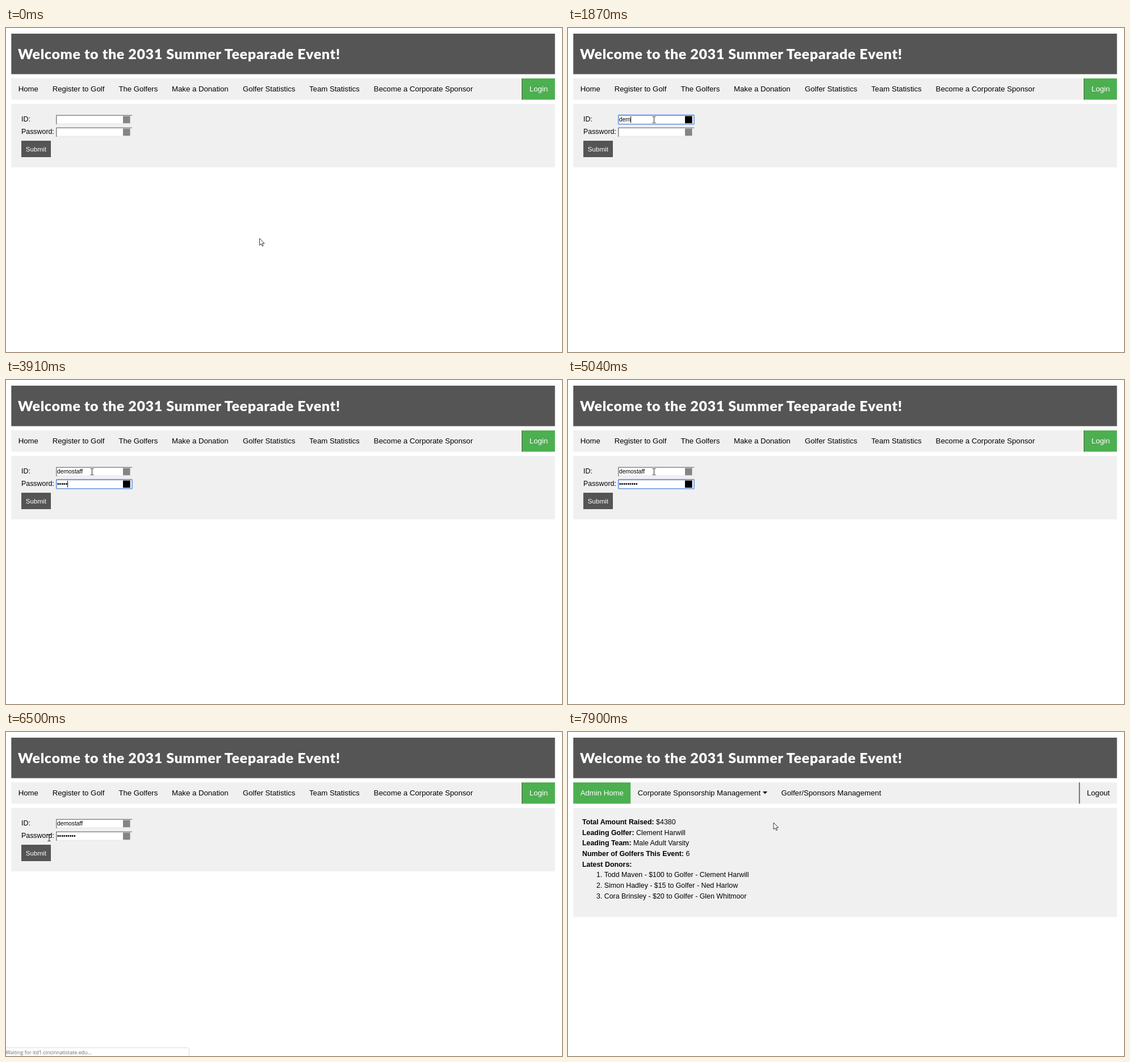
An HTML page for the animation above (8 s loop, 979x572 px).

```html
<!DOCTYPE html>
<html lang="en">
<head>
<meta charset="utf-8">
<title>Event login</title>
<style>
  html, body { margin: 0; width: 100%; height: 100%; overflow: hidden; background: #fff; }
  svg { display: block; width: 979px; height: 572px; font-family: "Liberation Sans", Arial, sans-serif; }
  .title { font: 900 25px Lato, sans-serif; letter-spacing: .63px; fill: #fff; }
  .bar { fill: #f0f0f0; }
  .dark { fill: #555; }
  .green { fill: #4caf50; }
  .light { fill: #fff; }
  .nav { font-size: 13.2px; }
  .body { font-size: 12.4px; }
  .button { font-size: 11.6px; }
  .entry { font-size: 10.33px; }
  .status { font: 8.9px "Open Sans", sans-serif; fill: #6a6a6a; }
  .ring { fill: none; stroke: #7da2ec; stroke-width: 1.8; }
  tspan { font-weight: bold; }
</style>
</head>
<body>
<svg viewBox="0 0 979 572">
  <rect class="dark" x="9.3" y="10" width="957.3" height="71.5"/>
  <text class="title" x="21" y="54.5">Welcome to the 2031 Summer Teeparade Event!</text>
  <rect class="bar" x="9.3" y="89" width="957.3" height="37.5"/>

  <g id="login">
    <g class="nav">
      <text x="21.7" y="112">Home</text>
      <text x="81.7" y="112">Register to Golf</text>
      <text x="198.4" y="112">The Golfers</text>
      <text x="292" y="112">Make a Donation</text>
      <text x="417" y="112">Golfer Statistics</text>
      <text x="534" y="112">Team Statistics</text>
      <text x="647.6" y="112">Become a Corporate Sponsor</text>
      <rect class="dark" x="908" y="89" width="2" height="37.5"/>
      <rect class="green" x="909" y="89" width="57.6" height="37.5"/>
      <text class="light" x="921.8" y="112">Login</text>
    </g>
    <rect class="bar" x="9.3" y="134" width="957.3" height="112"/>
    <text class="body" x="27" y="165.3">ID:</text>
    <text class="body" x="27" y="187.2">Password:</text>
    <g id="fields"></g>
    <rect class="dark" x="27" y="199" width="52" height="29"/>
    <text class="button light" x="34.8" y="218">Submit</text>
  </g>

  <g id="admin">
    <g class="nav">
      <rect class="green" x="9.3" y="89" width="100.9" height="37.5"/>
      <text class="light" x="21.7" y="112">Admin Home</text>
      <text x="122.8" y="112">Corporate Sponsorship Management</text>
      <path d="M343 105h8l-4 4.5z"/>
      <text x="375.4" y="112">Golfer/Sponsors Management</text>
      <rect class="dark" x="899.7" y="89" width="1.6" height="37.5"/>
      <text x="913.7" y="112">Logout</text>
    </g>
    <rect class="bar" x="9.3" y="134" width="957.3" height="192.5"/>
    <g id="summary" class="body"></g>
  </g>

  <g id="status">
    <path d="M-2 557.5H319Q322.5 557.5 322.5 561V574H-2Z" fill="#fff" stroke="#ddd"/>
    <text class="status" x="-.5" y="569">Waiting for itd1.cincinnatistate.edu...</text>
  </g>

  <circle id="click" r="9.5" fill="#ff0" fill-opacity=".6"/>
  <g id="arrow"><path d="M.5 .5V12.6L3.3 10L5.3 14.2L7.1 13.4L5.2 9.3H9Z" fill="#fff" stroke="#222" stroke-width=".9"/></g>
  <g id="beam"><path d="M-2.7-5.5H-.8L0-4.9L.8-5.5H2.7M0-5V5M-2.7 5.5H-.8L0 4.9L.8 5.5H2.7" fill="none" stroke="#222"/></g>
  <g id="hand"><path d="M-1.5 .8Q-.2-.9 1.1 .8V5.3Q2.4 4.4 3.4 5.8Q4.8 5.1 5.6 6.4Q7.7 6.2 7.8 8V12L6.2 14.5V16.8H-1V14.8L-4.7 9.9Q-5 8.2-3.2 8.5L-1.5 10.2Z" fill="#fff" stroke="#222" stroke-width=".9"/></g>
</svg>
<script>
const LOOP = 8000, BLINK = 520, PRESS = 790, TAB = 2800, SUBMIT = 5810, LOADED = 6740;
const byId = id => document.getElementById(id);
const show = (node, on) => node.setAttribute('visibility', on ? 'inherit' : 'hidden');
const clamp = v => Math.min(1, Math.max(0, v));

const fields = [
  { top: 153, text: 'demostaff', focus: [850, TAB], start: PRESS,
    keys: [1470, 1620, 1870, 2010, 2180, 2360, 2490, 2660, 2730] },
  { top: 175, text: '•'.repeat(9), focus: [TAB, SUBMIT], start: TAB,
    keys: [3220, 3440, 3620, 3690, 3910, 4140, 4250, 4390, 4490] },
];

for (const f of fields) {
  const g = document.createElementNS('http://www.w3.org/2000/svg', 'g');
  g.setAttribute('transform', `translate(88 ${f.top})`);
  g.innerHTML = `<rect width="134" height="17" fill="#fff"/>
    <path d="M133.2 16.2H.8M133.2 16.2V1" stroke="#eaeaea" stroke-width="1.6" fill="none"/>
    <path d="M.8 17V1.3H134" stroke="#858585" stroke-width="1.5" fill="none"/>
    <rect class="ring" x=".7" y=".7" width="133.4" height="16.2" rx="1"/>
    <rect x="118" y="2.5" width="12.7" height="12.7"/>
    <text class="entry" x="2" y="12.3"></text>
    <rect y="3" width="1" height="11.5"/>`;
  [, , , f.ring, f.icon, f.label, f.caret] = g.children;
  byId('fields').append(g);
}

const summary = [
  ['Total Amount Raised:', '$4380'], ['Leading Golfer:', 'Clement Harwill'],
  ['Leading Team:', 'Male Adult Varsity'], ['Number of Golfers This Event:', '6'], ['Latest Donors:', ''],
];
const donors = ['Todd Maven - $100 to Golfer - Clement Harwill',
  'Simon Hadley - $15 to Golfer - Ned Harlow', 'Cora Brinsley - $20 to Golfer - Glen Whitmoor'];
const rowY = i => 163 + 18.65 * i;
byId('summary').innerHTML =
  summary.map(([k, v], i) => `<text x="25" y="${rowY(i)}"><tspan>${k}</tspan> ${v}</text>`).join('') +
  donors.map((d, i) => `<text x="50" y="${rowY(i + 5)}">${i + 1}.</text><text x="63.7" y="${rowY(i + 5)}">${d}</text>`).join('');

// Each leg is a quadratic curve walked in a few visible steps.
const legs = [
  { from: 70, to: 720, steps: 10, x: [446, 300, 151.5], y: [371, 267, 162] },
  { from: 5220, to: 5740, steps: 8, x: [151.5, 0, 63], y: [162, 310, 212] },
  { from: 6430, to: 6500, steps: 2, x: [63, 70, 76], y: [212, 200, 187] },
  { from: 7460, to: 7900, steps: 7, x: [76, 220, 361.5], y: [187, 187, 159.5] },
];
const curve = ([a, b, c], u) => (1 - u) ** 2 * a + 2 * u * (1 - u) * b + u * u * c;

function pointer(t) {
  const leg = legs.findLast(l => t >= l.from) || legs[0];
  const step = Math.floor((t - leg.from) / (leg.to - leg.from) * (leg.steps - 1) + 1e-6) + 1;
  const u = clamp(step / leg.steps), eased = u * u * (3 - 2 * u);
  return { x: curve(leg.x, eased), y: curve(leg.y, eased) };
}

function drawField(f, t, hovered) {
  const focused = t >= f.focus[0] && t < f.focus[1];
  const count = f.keys.filter(k => t >= k).length;
  f.label.textContent = f.text.slice(0, count);
  const last = count ? f.keys[count - 1] : f.start;
  show(f.ring, focused);
  show(f.caret, focused && (t - last) % (2 * BLINK) < BLINK);
  f.caret.setAttribute('x', 2 + (count ? f.label.getComputedTextLength() : 0));
  f.icon.setAttribute('fill', focused || hovered ? '#000' : '#858585');
}

function draw(t) {
  const { x, y } = pointer(t);
  const inside = (l, top, r, b) => x >= l && x < r && y >= top && y < b;
  const loaded = t >= LOADED;
  const anyFocus = t >= fields[0].focus[0] && t < SUBMIT;
  const over = fields.map(f => inside(88, f.top, 222, f.top + 17));

  show(byId('login'), !loaded);
  show(byId('admin'), loaded);
  fields.forEach((f, i) => drawField(f, t, over[i] && !anyFocus));

  const fade = t < 6430 ? 0 : t < 6990 ? 1 : t < 7065 ? .6 : t < 7140 ? .25 : 0;
  byId('status').setAttribute('opacity', fade);

  const onHand = !loaded && inside(27, 199, 79, 228);
  const onText = loaded ? inside(25, 150, 214, 225) : over.includes(true) || inside(27, 176, 85, 191);
  const shape = onHand ? 'hand' : onText ? 'beam' : 'arrow';
  for (const id of ['hand', 'beam', 'arrow']) {
    show(byId(id), id === shape);
    byId(id).setAttribute('transform', `translate(${x} ${y})`);
  }
  const click = byId('click');
  show(click, t >= PRESS && t < 850 || t >= SUBMIT && t < 5970);
  click.setAttribute('cx', x - .7);
  click.setAttribute('cy', y - .5);
}

function tick() {
  draw(performance.now() % LOOP);
  requestAnimationFrame(tick);
}
tick();
</script>
</body>
</html>
```
